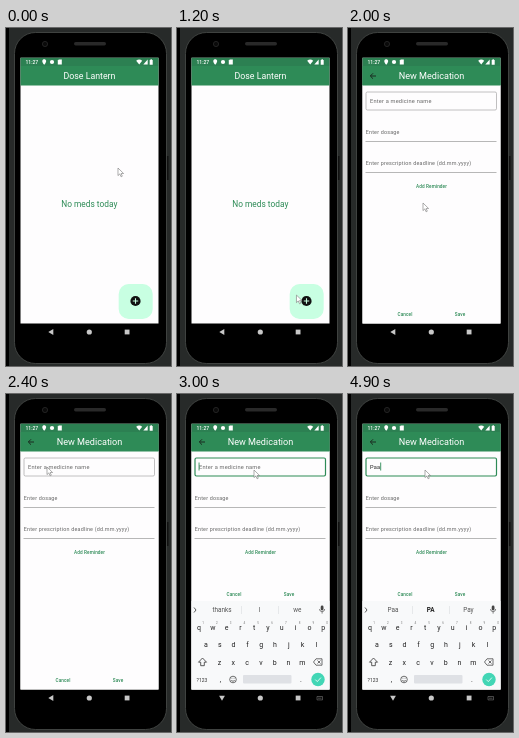
An HTML page for the animation above (5 s loop, 165 by 338 pixels).

```html
<!DOCTYPE html>
<html lang="en">
<head>
<meta charset="utf-8">
<style>
html, body { margin: 0; width: 100%; height: 100%; overflow: hidden; background: #272a29; }
svg { display: block; width: 100vw; height: 100vh; }
text { font-family: Roboto, Arial, sans-serif; fill: #333; }
.mid { text-anchor: middle; }
.title { fill: #fff; }
.action { font-size: 4.7px; font-weight: 500; letter-spacing: .1px; fill: #2e8b57; text-anchor: middle; }
.hint { font-size: 5.4px; letter-spacing: .2px; fill: #666; }
.key { font-size: 7px; fill: #222; text-anchor: middle; }
.num { font-size: 3px; fill: #777; text-anchor: middle; }
.word { font-size: 6.4px; fill: #555; text-anchor: middle; }
.line { fill: none; stroke: #333; stroke-width: .8; }
</style>
</head>
<body>
<svg viewBox="0 0 165 338" preserveAspectRatio="none">
  <defs><clipPath id="screen"><rect x="14.5" y="29.7" width="138" height="265.8"/></clipPath></defs>

  <!-- phone -->
  <rect width="165" height="338" fill="#272a29"/>
  <rect width="3" height="338" fill="#000"/>
  <rect x="160" y="128" width="2.5" height="24" fill="#111"/>
  <rect x="8.5" y="4.5" width="152" height="331" rx="21" fill="#000" stroke="#454846" stroke-width=".9"/>
  <rect x="68" y="14" width="32" height="3.4" rx="1.7" fill="#292929"/>
  <circle cx="39" cy="16" r="2.6" fill="#0a0a0a" stroke="#2a2a2a" stroke-width=".8"/>

  <g clip-path="url(#screen)">
    <rect x="14" y="29" width="139" height="267" fill="#fefdfe"/>
    <rect x="14" y="38" width="139" height="19.5" fill="#2e8b57"/>

    <g id="home">
      <text class="mid title" x="83.5" y="51" font-size="8.8">Dose Lantern</text>
      <text class="mid" x="83.3" y="179.4" font-size="8.35" style="fill:#2e8b57">No meds today</text>
      <rect x="112.7" y="256" width="34" height="35" rx="10" fill="#c8ffe2"/>
      <circle cx="129.5" cy="273" r="5.1" fill="#111"/>
      <path d="M126.8 273h5.4M129.5 270.3v5.4" stroke="#c8ffe2" stroke-width="1.1"/>
    </g>

    <g id="form">
      <rect x="14" y="57" width="139" height="239" fill="#fefdfe"/>
      <rect x="14" y="38" width="139" height="19.5" fill="#2e8b57"/>
      <path d="M28 48h-5.5M25 45.3l-2.7 2.7l2.7 2.7" class="line" style="stroke:#1a2a20;stroke-width:1"/>
      <text class="mid title" x="83.5" y="51" font-size="9.1">New Medication</text>
      <rect id="box" x="18" y="64" width="130.5" height="18" rx="1.4" fill="none"/>
      <text id="entry" class="hint" x="22" y="75" style="font-size:5.65px">Enter a medicine name</text>
      <rect id="caret" y="68.5" width=".9" height="8" fill="#2e8b57"/>
      <text class="hint" x="17.7" y="106">Enter dosage</text>
      <text class="hint" x="17.7" y="136.5">Enter prescription deadline (dd.mm.yyyy)</text>
      <path d="M17.5 113.5h131M17.5 144.5h131" stroke="#888" stroke-width=".6"/>
      <text class="action" x="83.5" y="160">Add Reminder</text>
      <g id="actions">
        <text class="action" x="57" y="288">Cancel</text>
        <text class="action" x="112" y="288">Save</text>
      </g>
    </g>

    <g id="board">
      <rect x="14" y="207" width="139" height="89" fill="#f8f9fa"/>
      <path d="M17 213.5l2 2.5l-2 2.5" class="line"/>
      <path d="M64.5 212v8M101.5 212v8" stroke="#d5d7da" stroke-width=".5"/>
      <g id="words"></g>
      <rect x="143.7" y="211.5" width="2.8" height="5" rx="1.4" fill="#444"/>
      <path d="M142.5 215a2.6 2.6 0 0 0 5.2 0M145.1 217.6v2" class="line" style="stroke-width:.6"/>
      <g id="keys"></g>
      <path d="M25.5 264l-4 4.2h2.2v3.5h3.6v-3.5h2.2z" class="line"/>
      <path d="M136.5 268l2.5-3.2h6v6.4h-6zM140.5 266.5l3 3m0-3l-3 3" class="line" style="stroke-width:.7"/>
      <text class="mid" x="25" y="287.5" font-size="5">?123</text>
      <text class="key" x="43.5" y="287.5">,</text>
      <circle cx="56" cy="285.5" r="3.3" class="line" style="stroke-width:.7"/>
      <path d="M54.3 286.4q1.7 1.8 3.4 0M54.6 284.3h.7M56.7 284.3h.7" class="line" style="stroke-width:.7"/>
      <rect x="66" y="281" width="48.5" height="8.5" rx="1" fill="#dfe1e5"/>
      <text class="key" x="124" y="287.5">.</text>
      <circle cx="141" cy="285.5" r="6.7" fill="#42d6b5"/>
      <path d="M138.3 285.6l2 2l3.6-4" class="line" style="stroke:#fff"/>
    </g>

    <!-- status bar -->
    <rect x="14" y="29" width="139" height="9" fill="#2c8052"/>
    <text class="title" x="19.5" y="36" font-size="5" font-weight="500">11:27</text>
    <g fill="#fff">
      <path d="M38.2 36.8c-3-3.2-2.1-5.6 0-5.6s3 2.4 0 5.6z"/>
      <circle cx="46" cy="34" r="2.1"/>
      <path d="M52.8 31.5h3v5h-4v-4z"/>
      <path d="M130.2 32.7q3-2.4 6 0l-3 3.9z"/>
      <path d="M137.3 36.5h4.4v-5z"/>
      <path d="M143.7 32h.8v-.7h1.4v.7h.8v4.7h-3z"/>
    </g>
  </g>

  <!-- navigation bar -->
  <g fill="#c8c8c8">
    <path id="back" d="M42.3 304l5-2.9v5.8z"/>
    <circle cx="83.3" cy="304" r="2.6"/>
    <rect x="118.7" y="301.6" width="4.8" height="4.8"/>
    <path id="switch" d="M140 302.5h5.5v3.4H140zM141 304.2h3.5" fill="none" stroke="#777" stroke-width=".6"/>
  </g>

  <path id="mouse" d="M0 0v7.6l1.8-1.7l1.3 2.9l1.2-.6l-1.2-2.7h2.5z" fill="#fff" stroke="#777" stroke-width=".6"/>
</svg>
<script>
const $ = id => document.getElementById(id);
const LOOP = 5000, OPEN = 1850, FOCUS = 2600, TYPED = 4900;
const clamp = v => Math.min(1, Math.max(0, v));
const ramp = (t, a, b) => clamp((t - a) / (b - a));
const smooth = u => u * u * (3 - 2 * u);
const show = (el, on) => el.setAttribute('visibility', on ? 'visible' : 'hidden');
const label = (cls, x, y, s) => `<text class="${cls}" x="${x}" y="${y}">${s}</text>`;

// time, x, y of the pointer tip
const path = [
  [0, 112, 140], [700, 105, 255], [1400, 123, 270], [1800, 123, 270],
  [2000, 75, 175], [2400, 41, 73], [2550, 41, 73], [2950, 77, 76], [LOOP, 77, 76]
];

const rows = [['qwertyuiop', 22, 235.5], ['asdfghjkl', 29, 253], ['zxcvbnm', 42.5, 270.5]];
$('keys').innerHTML = rows.map(([letters, x, y], r) => [...letters].map((c, i) => {
  const cx = x + i * 13.8;
  return label('key', cx, y, c) + (r ? '' : label('num', cx + 4, 229.5, (i + 1) % 10));
}).join('')).join('');

let shown = '';
function setWords(list) {
  if (shown === list) return;
  shown = list;
  $('words').innerHTML = list.split(' ').map((w, i) => label('word', 45 + i * 37.7, 218, w)).join('');
  if (list.includes('PA')) $('words').children[1].style.cssText = 'font-weight:700;fill:#222';
}

function pointer(t) {
  const i = path.findIndex((p, k) => k && t <= p[0]);
  const [a, b] = [path[i - 1], path[i]];
  const u = smooth(ramp(t, a[0], b[0]));
  return [1, 2].map(k => a[k] + (b[k] - a[k]) * u);
}

function draw(now) {
  const t = now % LOOP;
  const open = smooth(ramp(t, OPEN, 2000));
  const up = smooth(ramp(t, 2680, 2880));
  const focused = t >= FOCUS, typed = t >= TYPED;

  show($('form'), open > 0);
  $('form').setAttribute('opacity', open);
  $('form').setAttribute('transform', `translate(0 ${12 * (1 - open)})`);

  $('box').setAttribute('stroke', focused ? '#2e8b57' : '#8c8c8c');
  $('box').setAttribute('stroke-width', focused ? 1.2 : .55);

  const entry = $('entry');
  const value = typed ? 'Paa' : 'Enter a medicine name';
  if (entry.textContent !== value) entry.textContent = value;
  entry.style.fill = typed ? '#222' : '';
  $('caret').setAttribute('x', typed ? 22 + entry.getComputedTextLength() : 21.6);
  show($('caret'), focused && Math.floor((t - FOCUS) / 500) % 2 === 0);

  show($('board'), up > 0);
  $('board').setAttribute('transform', `translate(0 ${89 * (1 - up)})`);
  $('actions').setAttribute('transform', `translate(0 ${-86 * up})`);
  setWords(typed ? 'Paa PA Pay' : 'thanks I we');
  $('back').setAttribute('transform', up > 0 ? 'rotate(-90 45 304)' : '');
  show($('switch'), up > 0);

  $('mouse').setAttribute('transform', `translate(${pointer(t)})`);
  requestAnimationFrame(draw);
}
requestAnimationFrame(draw);
</script>
</body>
</html>
```
